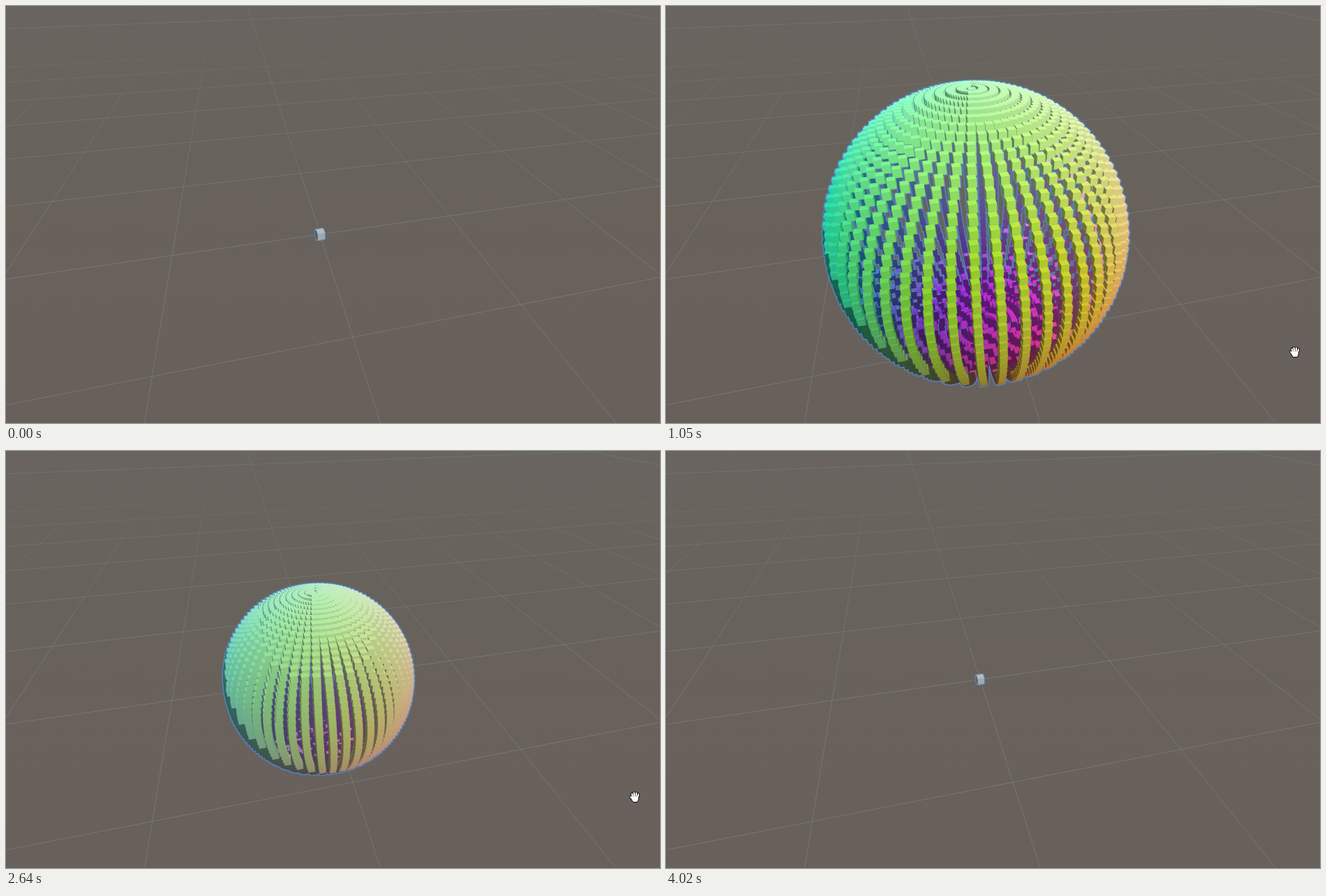
These frames come from a looping animation (937x598 px, 4.09 s). An HTML page with a canvas:

```html
<!DOCTYPE html>
<html lang="en">
<head>
<meta charset="utf-8">
<title>Cube sphere</title>
<style>
  html, body { margin: 0; width: 100%; height: 100%; overflow: hidden; background: #69625c; }
  canvas { display: block; width: 937px; height: 598px; }
</style>
</head>
<body>
<canvas id="stage" width="937" height="598"></canvas>
<script>
const W = 937, H = 598, LOOP = 4090;
const ctx = document.getElementById('stage').getContext('2d');

// [start ms, visible radius]
const STEPS = [
  [0, 9], [140, 12], [270, 27], [400, 57], [530, 94.5], [660, 143], [790, 178], [920, 205],
  [1050, 220], [1180, 221], [1310, 186], [1440, 139], [1580, 93], [1710, 53], [1840, 23.5],
  [1970, 11], [2100, 9], [2240, 27], [2370, 58], [2510, 98], [2640, 138.5], [2770, 179],
  [2900, 211], [3050, 222], [3170, 205], [3290, 179], [3420, 144], [3560, 96], [3690, 54],
  [3820, 24], [3960, 9], [4020, 8]
];
// [start ms, x, y], no x: hidden
const HAND = [[0], [140, 907, 521], [270, 901, 496], [3290, 905, 525], [3420, 904, 568], [3560, 904, 594], [3690]];

const at = (table, t) => table.reduce((hit, row) => row[0] <= t ? row : hit);

// ---- ground ----
const ground = document.createElement('canvas');
ground.width = W;
ground.height = H;

function floorPoint(m, k) {
  const w = 1 + 0.0665 * m - 0.256 * k;
  return { x: (450 + 227.9 * m - 80.2 * k) / w, y: (327.5 - 6.5 * m + 25.9 * k) / w, w };
}

function drawGround(g) {
  const sky = g.createLinearGradient(0, 0, 0, H);
  [[0, '#69645f'], [0.22, '#69635d'], [0.36, '#67625b'], [0.5, '#68625b'], [0.62, '#69615c'], [1, '#68605b']]
    .forEach(([p, c]) => sky.addColorStop(p, c));
  g.fillStyle = sky;
  g.fillRect(0, 0, W, H);
  g.lineWidth = 1;
  const piece = (a, b, major) => {
    if (a.w < 0.2 || b.w < 0.2) return;
    const near = Math.max(0.13, Math.min(1, 1 - (a.w - 1) / 1.9));
    g.strokeStyle = `rgba(133,150,148,${0.42 * (major ? Math.max(near, 0.6) : near)})`;
    g.beginPath();
    g.moveTo(a.x, a.y);
    g.lineTo(b.x, b.y);
    g.stroke();
  };
  const d = 0.5;
  for (let i = -14; i <= 30; i++) {
    for (let s = -16; s < 3; s += d) piece(floorPoint(i, s), floorPoint(i, s + d), i % 10 === 0);
  }
  for (let k = -16; k <= 2; k++) {
    for (let s = -14; s < 30; s += d) piece(floorPoint(s, k), floorPoint(s + d, k), k % 10 === 0);
  }
}

// ---- sphere of cubes ----
const F = 585, N = 50, HALF = 4.4, R_MAX = 180;
const VIEW = { x: 496, y: 341 };              // optical centre
const CAM = { x: -70.6, y: 341.4, z: -472 };
const LIGHT = [0.32, 0.766, -0.557];
const AMBIENT = [0.19, 0.24, 0.27];
const LON = 2 * Math.PI / N, LAT = Math.PI / N;

const clamp = (v, lo, hi) => Math.max(lo, Math.min(hi, v));
const tone = v => Math.round(255 * Math.pow(clamp(v, 0, 1), 1 / 2.2));
const dot = (a, b) => a[0] * b[0] + a[1] * b[1] + a[2] * b[2];

function project(x, y, z) {
  const s = F / (F + 0.1936 * x - 0.602 * y + 0.7746 * z);
  return [
    VIEW.x + s * (-46 + 0.970 * x - 0.2424 * z),
    VIEW.y + s * (-13.5 - 0.146 * x - 0.7985 * y - 0.584 * z)
  ];
}

// Does sunlight reach p through the gaps on the far side of the shell?
function lit(p, R) {
  const b = dot(p, LIGHT);
  if (b > -2 || R < 12) return true;
  const n = p.map((v, i) => (v - 2 * b * LIGHT[i]) / R);
  const lat = Math.acos(clamp(n[1], -1, 1)), lon = Math.atan2(n[2], n[0]);
  const sin = Math.sin(lat), cos = Math.cos(lat);
  const east = [-Math.sin(lon), 0, Math.cos(lon)];
  const south = [cos * Math.cos(lon), -sin, cos * Math.sin(lon)];
  const off = (v, step) => Math.abs(v / step - Math.round(v / step)) * step * R;
  // half width of a cube's shadow on the shell along axis e
  const reach = e => {
    const k = dot(e, LIGHT) / Math.max(0.02, dot(n, LIGHT));
    return HALF * e.reduce((sum, v, i) => sum + Math.abs(v - n[i] * k), 0);
  };
  return off(lon, LON) * sin > reach(east) || off(lat, LAT) > reach(south);
}

function makeCubes(R) {
  const list = [];
  for (let j = 0; j <= N; j++) {
    const ring = Math.sin(j * LAT) * R, y = Math.cos(j * LAT) * R;
    const count = j % N && R > 0.1 ? N : 1;
    for (let i = 0; i < count; i++) {
      const x = ring * Math.cos(i * LON), z = ring * Math.sin(i * LON);
      list.push({ x, y, z, d: Math.hypot(x - CAM.x, y - CAM.y, z - CAM.z) });
    }
  }
  return list.sort((a, b) => b.d - a.d);
}

function cubeFaces(p, R) {
  const h = HALF;
  const corner = (sx, sy, sz) => project(p.x + sx * h, p.y + sy * h, p.z + sz * h);
  const base = [p.x, p.y, p.z].map(v => clamp(0.5 + 0.5 * v / R_MAX, 0.025, 0.975));
  const face = (normal, pts) => {
    const sun = Math.max(0, dot(normal, LIGHT));
    const mid = [p.x + normal[0] * h, p.y + normal[1] * h, p.z + normal[2] * h];
    const k = sun && lit(mid, R) ? sun : 0;
    const path = new Path2D();
    pts.forEach((q, i) => i ? path.lineTo(q[0], q[1]) : path.moveTo(q[0], q[1]));
    path.closePath();
    return { path, fill: `rgb(${base.map((v, i) => tone(v * (k + AMBIENT[i]))).join()})` };
  };
  const tl = corner(-1, 1, -1), tr = corner(1, 1, -1);
  const bl = corner(-1, -1, -1), br = corner(1, -1, -1);
  const backL = corner(-1, 1, 1), backR = corner(1, 1, 1);
  const faces = [
    face([0, 1, 0], [tl, tr, backR, backL]),
    face([0, 0, -1], [tl, tr, br, bl])
  ];
  if (p.x - h > CAM.x) faces.push(face([-1, 0, 0], [tl, backL, corner(-1, -1, 1), bl]));
  else if (p.x + h < CAM.x) faces.push(face([1, 0, 0], [tr, backR, corner(1, -1, 1), br]));
  return faces;
}

function drawSphere(r) {
  const inner = Math.max(0, r - 8);
  const R = inner / Math.hypot(1, inner / F);
  const faces = makeCubes(R).flatMap(p => cubeFaces(p, R));
  ctx.lineJoin = 'round';
  ctx.strokeStyle = '#5680b4';
  ctx.lineWidth = 3.6;
  faces.forEach(f => ctx.stroke(f.path));
  ctx.lineWidth = 0.4;
  faces.forEach(f => {
    ctx.fillStyle = ctx.strokeStyle = f.fill;
    ctx.fill(f.path);
    ctx.stroke(f.path);
  });
}

// ---- pointer ----
const hand = new Path2D(
  'M-3 1L-4-4M-.8 0L-1.2-5.6M1.6 0L2-5.4M3.8 1L5-3.4M-5.8 0L-3 3.6' +
  'M-3 1L3.8 1L3.6 3.5L2.6 6L-1.8 6L-3.2 3.6Z');

function drawHand(x, y) {
  ctx.save();
  ctx.translate(x, y);
  ctx.lineCap = ctx.lineJoin = 'round';
  [['#1c1b1d', 4.4], ['#fff', 2.1]].forEach(([color, width]) => {
    ctx.strokeStyle = ctx.fillStyle = color;
    ctx.lineWidth = width;
    ctx.stroke(hand);
    ctx.fill(hand);
  });
  ctx.restore();
}

// ---- playback ----
drawGround(ground.getContext('2d'));
const start = performance.now();
let shown = null;

function tick() {
  const t = (performance.now() - start) % LOOP;
  const step = at(STEPS, t);
  if (step !== shown) {
    shown = step;
    ctx.drawImage(ground, 0, 0);
    drawSphere(step[1]);
    const [, x, y] = at(HAND, step[0]);
    if (x) drawHand(x, y);
  }
  requestAnimationFrame(tick);
}
tick();
</script>
</body>
</html>
```
